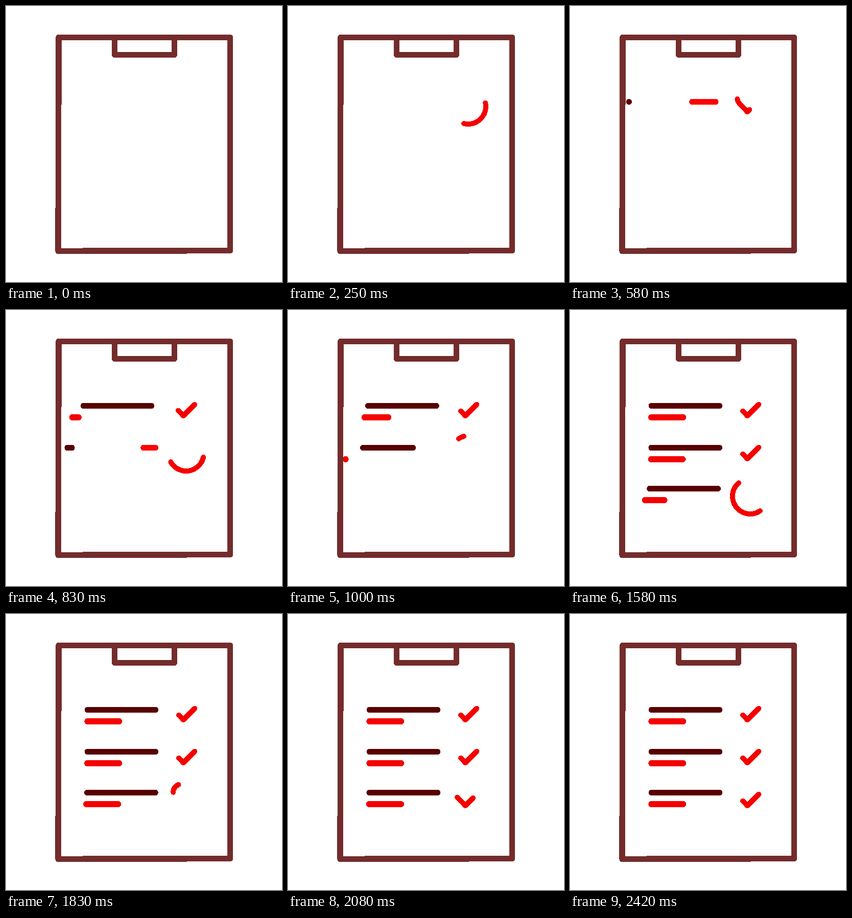
Recreate the animation shown at these times as an HTML page. Size 540 by 540 pixels, loop 2.67 s.

```html
<!DOCTYPE html>
<html lang="en">
<head>
<meta charset="utf-8">
<title>Checklist</title>
<style>
  html, body { margin: 0; width: 100%; height: 100%; overflow: hidden; background: #fff; }
  svg { display: block; width: 100%; height: 100%; }
</style>
</head>
<body>
<svg viewBox="0 0 540 540" fill="none" stroke-linecap="round" stroke-linejoin="round" shape-rendering="crispEdges">
  <clipPath id="page"><rect x="104" y="60" width="334" height="420"/></clipPath>
  <g id="rows" clip-path="url(#page)"></g>
  <g stroke="#732c2b" stroke-width="11.6">
    <path d="M102.98 61.5H438.5V478.45L102.15 479.45Z"/>
    <path d="M212.5 62V95.5H329.5V62" stroke-width="11"/>
  </g>
</svg>
<script>
const LOOP = 2670, FPS = 12, LAST = 29;
const RED = '#f50000', DARK = '#580000';
const LEFT = 159.3, BAR = 133.4, NOTE = 62.2;
const NOTE_DELAY = 2.3;
const TICK_TIME = 11;

// Times are in ticks of the frame rate.
const rows = [
  { y: 187.5, cy: 196.5, barStart: 7, tickEnd: 11.2 },
  { y: 269.5, cy: 280.5, barStart: 9.8, tickEnd: 18.5 },
  { y: 349.5, cy: 364.5, barStart: 14.5, tickEnd: 28 }
];

const clamp01 = x => Math.min(1, Math.max(0, x));

function addPath(color, width) {
  const el = document.createElementNS('http://www.w3.org/2000/svg', 'path');
  el.setAttribute('stroke', color);
  el.setAttribute('stroke-width', width);
  document.getElementById('rows').append(el);
  return el;
}

function drawLine(el, from, to, y) {
  el.setAttribute('d', to >= from ? `M${from} ${y}H${to}` : '');
}

// Slides in from behind the board's edge, slowing down, while growing to full length.
function slideIn(el, age, length, growTime, y) {
  const x = LEFT - 44 * Math.exp(-0.57 * age);
  drawLine(el, x, x + length * clamp01(age / growTime), y);
}

// A short dash that runs ahead of the bar and vanishes at its right end.
function dart(el, age, y) {
  const x = 239 + 150 * age;
  drawLine(el, x, Math.min(x + 46, LEFT + BAR), y);
}

// Trims the ring-and-tick path; both ends ease towards the finished tick.
function drawTick(el, left) {
  el.setAttribute('visibility', left < TICK_TIME ? 'visible' : 'hidden');
  if (left >= TICK_TIME) return;
  const total = el.getTotalLength();
  const to = total * (1 - (left / TICK_TIME) ** 2.6);
  const from = Math.max(0, total - 45 - 1.11 * left ** 2 - 75 * Math.max(0, left - 6.9));
  el.setAttribute('stroke-dasharray', `${Math.max(0.1, to - from)} 9999`);
  el.setAttribute('stroke-dashoffset', -from);
}

for (const row of rows) {
  row.dash = addPath('#ff0000', 11.4);
  row.bar = addPath(DARK, 11.4);
  row.note = addPath(RED, 12);
  row.tick = addPath(RED, 10);
  // Anticlockwise ring from the top, then a curl into the tick.
  row.tick.setAttribute('d', `M352.5 ${row.cy - 34.5}` +
    'a34.5 34.5 0 0 0 0 69a34.5 34.5 0 0 0 0 -69' +
    'c-16 0 -34 12.5 -20.5 29.5l15 15.5l22.4 -22.4');
}

function render(t) {
  const k = Math.min(LAST, Math.floor((t % LOOP + 4) * FPS / 1000));
  for (const row of rows) {
    const age = k - row.barStart;
    dart(row.dash, age, row.y);
    slideIn(row.bar, age, BAR, 3, row.y);
    slideIn(row.note, age - NOTE_DELAY, NOTE, 3.6, row.y + 22.5);
    drawTick(row.tick, Math.max(0, row.tickEnd - k));
  }
}

const start = performance.now();
function loop() {
  render(performance.now() - start);
  requestAnimationFrame(loop);
}
loop();
</script>
</body>
</html>
```
